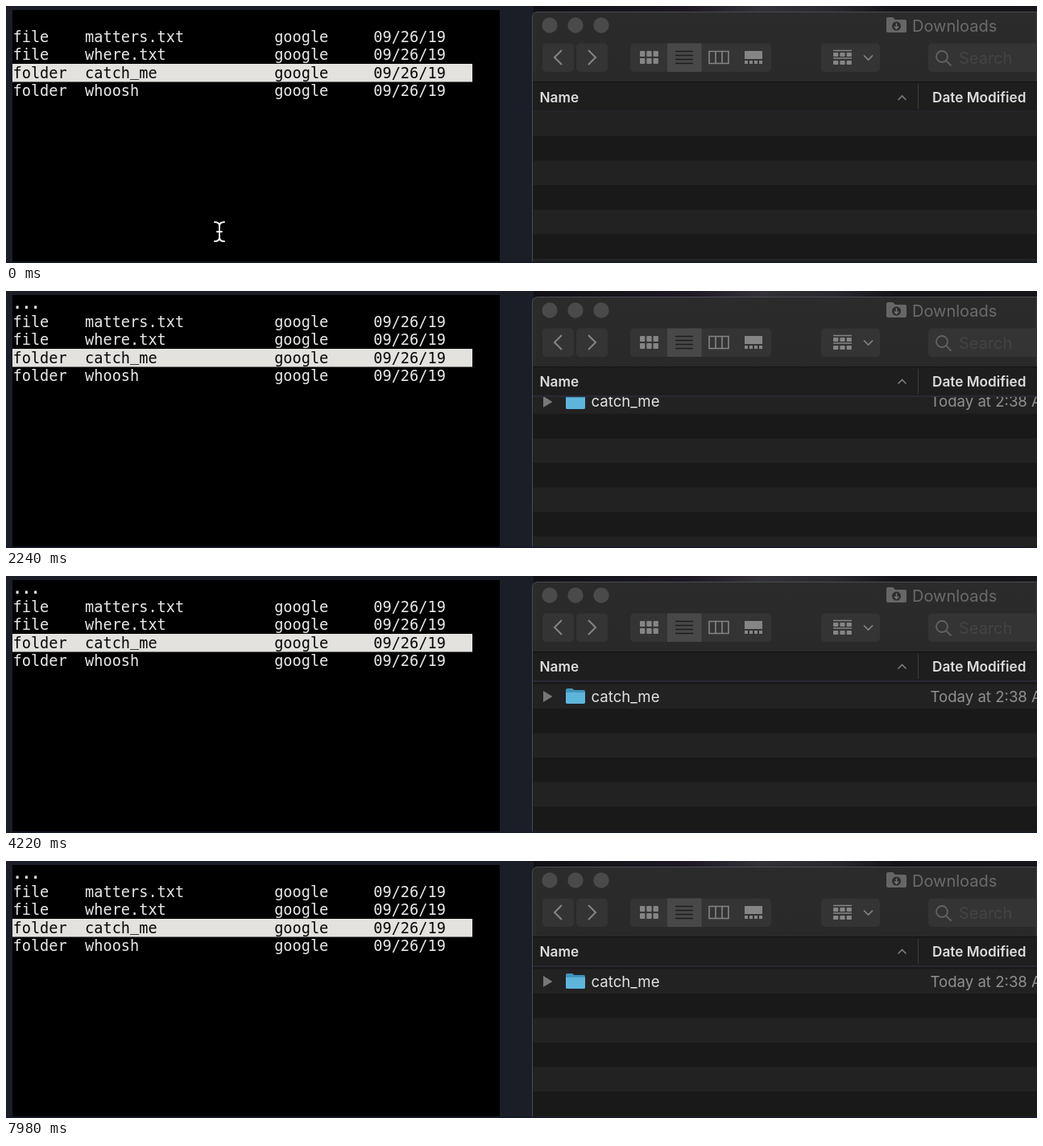
Animation of 1280x320 px, one loop 8 s. Source, as an HTML page:

```html
<!DOCTYPE html>
<html lang="en">
<head>
<meta charset="utf-8">
<title>Folder download</title>
<style>
  html, body { margin: 0; width: 100%; height: 100%; overflow: hidden; background: #1b1e27; }
  svg { display: block; width: 1280px; height: 320px; }
  text { white-space: pre; }
  .mono { font: 18.6px "DejaVu Sans Mono", monospace; fill: #e8e8e8; }
  .ui { font-family: Inter, "Open Sans", sans-serif; }
  .head { font-size: 17.2px; font-weight: 600; fill: #dcdcdc; }
  .row { font-size: 18.6px; }
  .line { fill: none; stroke: #858585; stroke-width: 1.6; }
</style>
</head>
<body>
<svg id="stage" viewBox="0 0 1280 320">
  <defs>
    <linearGradient id="photo">
      <stop offset="0" stop-color="#111116"/>
      <stop offset=".3" stop-color="#1d1823"/>
      <stop offset=".45" stop-color="#343138"/>
      <stop offset=".6" stop-color="#29282e"/>
      <stop offset=".72" stop-color="#131318"/>
      <stop offset="1" stop-color="#17151a"/>
    </linearGradient>
    <linearGradient id="toolbar" x2="0" y2="1">
      <stop offset="0" stop-color="#2b2b2b"/>
      <stop offset="1" stop-color="#252525"/>
    </linearGradient>
    <clipPath id="listArea"><path d="M654 131.5H1280V320H654Z"/></clipPath>
  </defs>

  <rect width="1280" height="320" fill="#1b1e27"/>
  <rect x="8" y="5" width="605" height="313.5" fill="#000"/>
  <g id="terminal"></g>
  <path id="pointer" fill="none" stroke-linecap="round" d="M259 269Q265 269 265 274V288Q265 293 259 293M271 269Q265 269 265 274M265 288Q265 293 271 293M262 281H268" stroke="#f4f4f4" stroke-width="2"/>

  <rect x="655" width="625" height="9" fill="url(#photo)"/>
  <path d="M653.5 320V14Q653.5 7.5 661 7.5H1280V320Z" fill="url(#toolbar)" stroke="#4a4b50"/>
  <g id="lights" fill="#4a4a4a"></g>

  <g transform="translate(1093 14)">
    <path d="M0 2Q0 0 2 0H8L11 3H23Q25 3 25 5V17Q25 19 23 19H2Q0 19 0 17Z" fill="#666"/>
    <circle cx="12.5" cy="11" r="5.5" fill="#2b2b2b"/>
    <path d="M12.5 7.5V14M9.8 11.5L12.5 14.2L15.2 11.5" fill="none" stroke="#777" stroke-width="1.5"/>
  </g>
  <text class="ui" x="1125" y="31.5" font-size="20" fill="#6b6b6b">Downloads</text>

  <g id="buttons" fill="#343434"></g>
  <rect x="821" y="46.5" width="42.5" height="35.5" fill="#484848"/>
  <path class="line" d="M690 55L681 64L690 73M723 55L732 64L723 73" style="stroke-width:2"/>
  <g id="tiles" fill="#858585"></g>
  <path d="M831 56.5H853M831 61.5H853M831 66.5H853M831 71.5H853" stroke="#1d1d1d" stroke-width="1.4"/>
  <path class="line" d="M873 56.5H897V71.5H873ZM881 56.5V71.5M889 56.5V71.5"/>
  <path d="M917 56H939V66H917Z" fill="#858585"/>
  <path class="line" d="M917 70H939" stroke-dasharray="4 2" style="stroke-width:4"/>
  <path class="line" d="M1027 55.5H1050M1027 65H1050M1065 61.5L1070.5 67L1076 61.5"/>
  <g class="line" style="stroke:#626262;stroke-width:1.8">
    <circle cx="1162" cy="63" r="7"/>
    <path d="M1167 68L1173.5 74.5"/>
  </g>
  <text class="ui" x="1183" y="71.5" font-size="20" fill="#444">Search</text>

  <g clip-path="url(#listArea)">
    <rect x="654" y="131" width="626" height="189" fill="#191919"/>
    <g id="stripes" fill="#222"></g>
    <g id="entry">
      <path d="M667 143L678.5 150L667 157Z" fill="#777"/>
      <path d="M695 142Q695 140 697 140H703L705.5 142H717Q719 142 719 144V157Q719 159 717 159H697Q695 159 695 157Z" fill="#4295bb"/>
      <path d="M695 145H719V157Q719 159 717 159H697Q695 159 695 157Z" fill="#5eb5dc"/>
      <text class="ui row" x="726.5" y="156.5" fill="#e4e4e4">catch_me</text>
      <text class="ui row" x="1147.5" y="156.5" fill="#909090">Today at 2:38 AM</text>
    </g>
  </g>
  <rect x="654" y="94" width="626" height="37.5" fill="#1e1e1f"/>
  <path d="M654 94.5H1280" stroke="#111"/>
  <path id="rule" d="M654 131H1280"/>
  <path d="M1132.5 97V128" stroke="#3b3b3b"/>
  <g id="headings">
    <text class="ui head" x="662.5" y="120">Name</text>
    <text class="ui head" x="1150" y="120">Date Modified</text>
    <path class="line" d="M1107.5 117L1112.5 112L1117.5 117" style="stroke:#7c7c7c"/>
  </g>
  <path d="M0 319H1280" stroke="#141a2a" stroke-width="1.5"/>
</svg>
<script>
const LOOP = 8000;
const KEY_PRESS = 1660;
const SLIDE_START = 1890;
const SLIDE_TIME = 650;
const SLIDE_DISTANCE = 32;
const ROW = 30.5;

const $ = id => document.getElementById(id);

function add(parent, tag, attributes, content = "") {
  const node = document.createElementNS("http://www.w3.org/2000/svg", tag);
  for (const [name, value] of Object.entries(attributes)) node.setAttribute(name, value);
  node.innerHTML = content;
  return $(parent).appendChild(node);
}

function show(node, visible) {
  node.setAttribute("visibility", visible ? "visible" : "hidden");
}

function shift(id, y) {
  $(id).setAttribute("transform", `translate(0 ${y})`);
}

const listing = [["file", "matters.txt"], ["file", "where.txt"], ["folder", "catch_me"], ["folder", "whoosh"]];
const SELECTED = 2;
// Lift underscores so they stay inside the highlighted line.
const RAISED = '<tspan dy="-2.5">_</tspan><tspan dy="2.5">\u200b</tspan>';

add("terminal", "rect", { x: 8, y: 72, width: 571, height: 22.5, fill: "#e3e2df" });
listing.forEach(([kind, name], i) => {
  const line = kind.padEnd(8) + name.padEnd(21) + "google".padEnd(11) + "09/26/19";
  const [start, rest] = line.split("_");
  add("terminal", "text", {
    class: "mono", x: 8.5, y: 45 + i * 22.4,
    style: i === SELECTED ? "fill:#080808" : ""
  }, rest ? `${start}<tspan dy="-2.5">_</tspan><tspan dy="2.5">${rest}</tspan>` : line);
});
const dots = add("terminal", "text", { class: "mono", x: 8.5, y: 22, style: "font-weight:bold" }, "...");

for (const x of [675, 707, 739]) add("lights", "circle", { cx: x, cy: 24, r: 9.7 });

for (const [x, width] of [[666, 39], [708, 39], [775, 175], [1012, 73], [1145, 150]]) {
  add("buttons", "rect", { x, y: 46.5, width, height: 35.5, rx: 5 });
}

function tiles(x, y, height, gap) {
  for (let i = 0; i < 6; i++) {
    add("tiles", "rect", { x: x + i % 3 * 8.3, y: y + Math.floor(i / 3) * gap, width: 6.3, height, rx: 1 });
  }
}
tiles(787, 56, 7, 9);
tiles(1027, 58, 5, 10);

for (let i = -1; i < 4; i++) {
  add("stripes", "rect", { x: 654, y: i * 2 * ROW, width: 626, height: ROW });
}

// Frames come in groups of three: two short ones, then a long one.
function frameTime(t) {
  const phase = t + 20;
  const step = Math.min(2, Math.floor(phase % 140 / 20));
  return Math.floor(phase / 140) * 140 + step * 140 / 3 - 20;
}

function render(t) {
  const now = frameTime(t);
  const pressed = t >= KEY_PRESS;
  const inserted = now >= SLIDE_START;
  const progress = Math.min(1, Math.max(0, (now - SLIDE_START) / SLIDE_TIME));
  const offset = -SLIDE_DISTANCE * (1 + Math.cos(Math.PI * progress)) / 2;

  show(dots, pressed);
  show($("pointer"), !pressed);
  show($("entry"), inserted);
  shift("entry", offset);
  shift("stripes", inserted ? 134.5 + offset : 131.5);
  shift("headings", inserted ? -1.5 : 0);
  $("rule").setAttribute("stroke", inserted ? "#34344a" : "#2b2b30");
}

function tick(now) {
  render(now % LOOP);
  requestAnimationFrame(tick);
}
render(0);
requestAnimationFrame(tick);
</script>
</body>
</html>
```
